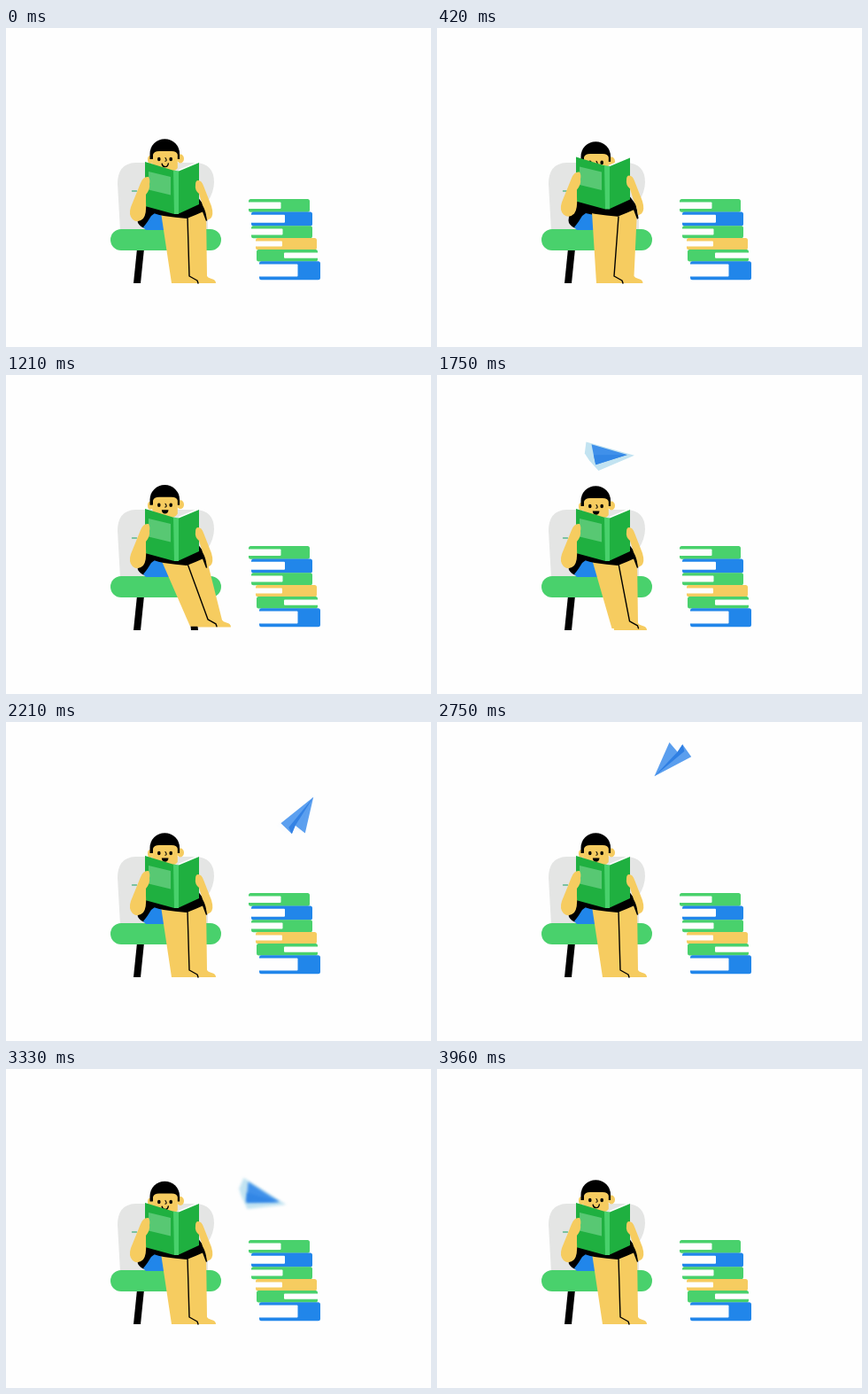
An HTML page with a canvas that plays this animation: 480 by 360 pixels, repeating every 4 s.

```html
<!DOCTYPE html>
<html lang="en">
<head>
<meta charset="utf-8">
<title>Reader and paper plane</title>
<style>
  html, body { margin: 0; width: 100%; height: 100%; overflow: hidden; background: #fefefe; }
  canvas { display: block; width: 480px; height: 360px; }
</style>
</head>
<body>
<canvas id="stage"></canvas>
<script>
const LOOP = 4000, STEP = LOOP / 96;
const SKIN = '#f6cc60', INK = '#000', GREEN = '#49d16c', LEAF = '#1fb040',
      BLUE = '#2186ea', GREY = '#e4e5e4', PAPER = '#fefefe';

const canvas = document.getElementById('stage');
const ctx = canvas.getContext('2d');
const dpr = window.devicePixelRatio || 1;
canvas.width = 480 * dpr;
canvas.height = 360 * dpr;

function smooth(t, from, to) {
  const u = Math.min(1, Math.max(0, (t - from) / (to - from)));
  return u * u * (3 - 2 * u);
}

// Rises from 0 to 1 between a and b, falls back between c and d.
const pulse = (t, a, b, c, d) => smooth(t, a, b) - smooth(t, c, d);

function pose(t) {
  const hide = pulse(t, 0, 350, 500, 800);
  return {
    book: -5.5 * hide,
    head: 3 * hide - 2.5 * pulse(t, 500, 850, 900, 1500) + 1.5 * pulse(t, 3000, 3250, 3420, 3700),
    legA: -7 * hide + 21 * pulse(t, 700, 1120, 1300, 2200),
    legB: -4.5 * hide + 17 * pulse(t, 700, 1120, 1250, 1700),
    talking: t > 900 && t < 3050
  };
}

// The plane darts in, circles once and drops behind the stack.
function flight(t) {
  const turn = Math.min(120 + 0.26 * (t - 2750), 271);
  const rad = turn * Math.PI / 180;
  const entry = Math.exp((1750 - t) / 137);
  const drop = Math.max(0, t - 3330) / 270;
  const tilt = 15 * Math.cos((t - 2750) / 580 * Math.PI);
  return {
    x: 288 + 51 * Math.cos(rad) - 54 * entry + 20 * Math.sin(drop * 1.6),
    y: 92 - 54 * Math.sin(rad) - 35 * Math.sqrt(entry) + 70 * drop * drop,
    angle: -(turn + 90 + tilt) - 42 * entry + 60 * drop,
    soft: 1 - pulse(t, 1850, 2250, 3080, 3260)
  };
}

function fill(d, color) {
  ctx.fillStyle = color;
  ctx.fill(new Path2D(d));
}

function stroke(d, color, width) {
  ctx.strokeStyle = color;
  ctx.lineWidth = width;
  ctx.lineCap = ctx.lineJoin = 'round';
  ctx.stroke(new Path2D(d));
}

function box(x, y, w, h, color, radius) {
  ctx.fillStyle = color;
  ctx.beginPath();
  ctx.roundRect(x, y, w, h, radius);
  ctx.fill();
}

function oval(x, y, rx, ry, color) {
  ctx.fillStyle = color;
  ctx.beginPath();
  ctx.ellipse(x, y, rx, ry, 0, 0, 7);
  ctx.fill();
}

function shifted(y, draw) {
  ctx.save();
  ctx.translate(0, y);
  draw();
  ctx.restore();
}

function drawChair() {
  fill('M146 152H214Q235 153 235 174Q235 184 228 196V229H129L126 176Q126 153 146 152Z', GREY);
  stroke('M142.5 184H147.5', '#58b78a', 1.3);
  fill('M148 249H156L152 288H144Z', INK);
  fill('M205 249H213L217 288H209Z', INK);
  box(118, 227, 125, 24, GREEN, 12);
}

function drawLegs(a, b) {
  const ya = 288 - Math.max(0, a) * 0.2, yb = 288 - Math.max(0, b) * 0.2;
  fill(`M190 205L${200 + b} ${yb}H${237 + b}q0 -4 -5 -5q-4 -1 -5 -3L226 205Z`, SKIN);
  fill(`M175 208L${187 + a} ${ya}h30q0 -3 -4 -5l-6 -3L205 208Z`, SKIN);
  stroke(`M205 213L${207 + a} ${ya - 8}l9 5l1 3`, INK, 1.4);
}

function drawBody(p) {
  fill('M158 170L154 200Q147 214 149 220Q152 225 157 226L180 228V205L216 195V165Z', INK);
  fill('M155 225Q160 219 164 212L168 209L177 211L188 228H158Z', BLUE);
  drawLegs(p.legA, p.legB);
  shifted(p.book * 0.4, () =>
    fill('M158 190V204Q166 210 178 212Q192 214 204 215L214 211L222 207.5L226 218L227.5 217L225 202L216 190Z', INK));
}

function drawHead(talking, sink) {
  oval(197, 147.5, 4, 5, SKIN);
  oval(163, 148.5, 3, 4.5, SKIN);
  fill('M162.5 148V142A16.8 16.8 0 0 1 196.1 142V148Z', INK);
  fill('M166 147V143Q167 139 173 139H187Q193 139 193.8 143V158Q191 163 180 163Q167 163 165 152Z', SKIN);
  shifted(sink, () => {
    oval(172.8, 148, 1.8, 2.3, INK);
    oval(186.2, 148, 1.8, 2.3, INK);
    stroke('M180 146.5Q182.5 150 179.8 150.3', INK, 1.1);
    if (talking) fill('M175.8 153.5H183.5Q183 157.8 179.6 157.8Q176.3 157.8 175.8 153.5Z', INK);
    else stroke('M176.2 153.3Q176.8 156.6 179.8 156.6Q182.8 156.6 183.3 153', INK, 1.4);
  });
}

function drawBook() {
  fill('M195 160L217 150.5L218 153L195 163Z', '#fff');
  fill('M157 151L190 161V210L157 201Z', LEAF);
  fill('M194 162L218 152V199L194 210Z', LEAF);
  fill('M189 160.5L195 161.5V210H190Z', GREEN);
  fill('M161 162L186 168V188.5L161 182.5Z', '#58c873');
}

function drawArms() {
  fill('M161 168Q155 167 152 175L141 202Q138 211 143 216Q149 221 155 215Q159 210 158 196V188Q163 182 162 176Q163 171 161 168Z', SKIN);
  fill('M217 172Q221 172 223 178L232 201Q235 211 231 215L227 217Q226 207 222 200L218 187Q213 183 214 177Q214 172 217 172Z', SKIN);
}

function drawStack() {
  let y = 193;
  const volume = (x, height, color, pages, flip) => {
    box(x, y, 69, height + 0.3, color, 2.5);
    box(flip ? x + 69.5 - pages : x - 0.5, y + 3.4, pages, height - 6.8, PAPER, 1);
    y += height;
  };
  volume(274, 14.4, GREEN, 37);
  volume(277, 15.8, BLUE, 38.5);
  volume(277, 13.8, GREEN, 36);
  volume(282, 13, SKIN, 30.5);
  volume(283, 13.2, GREEN, 38.5, true);
  volume(286, 20.8, BLUE, 44);
}

function drawPlane(t) {
  if (t < 1615 || t > 3600) return;
  const { x, y, angle, soft } = flight(t);
  ctx.save();
  ctx.translate(x, y);
  ctx.rotate(angle * Math.PI / 180);
  if (soft < 1) {
    fill('M24 0L-15 15L-14 1L-24 3L-21 -14Z', '#5a9eee');
    fill('M24 0L-14 1L-24 3L-20 -4Z', '#2f7fe3');
  }
  if (soft > 0) {
    ctx.globalAlpha = soft;
    if (t > 3000) ctx.filter = `blur(${1.4 * dpr}px)`;
    fill('M28 0L-26 -17L-28 -4L-23 4L-13 16Z', '#c2e3f1');
    fill('M20 -1L-20 -14L-18 -2L-16 9Z', '#3f90ea');
    fill('M20 -1L-18 -2L-16 9Z', '#3286e5');
  }
  ctx.restore();
}

function draw(ms) {
  const t = Math.floor((ms % LOOP + 4) / STEP) * STEP % LOOP;
  const p = pose(t);
  ctx.setTransform(dpr, 0, 0, dpr, 0, 0);
  ctx.fillStyle = PAPER;
  ctx.fillRect(0, 0, 480, 360);
  drawChair();
  drawBody(p);
  shifted(p.head, () => drawHead(p.talking, Math.max(0, p.head) * 0.3));
  shifted(p.book, () => { drawBook(); drawArms(); });
  drawPlane(t);
  drawStack();
}

const start = performance.now();
function tick() {
  draw(performance.now() - start);
  requestAnimationFrame(tick);
}
tick();
</script>
</body>
</html>
```
